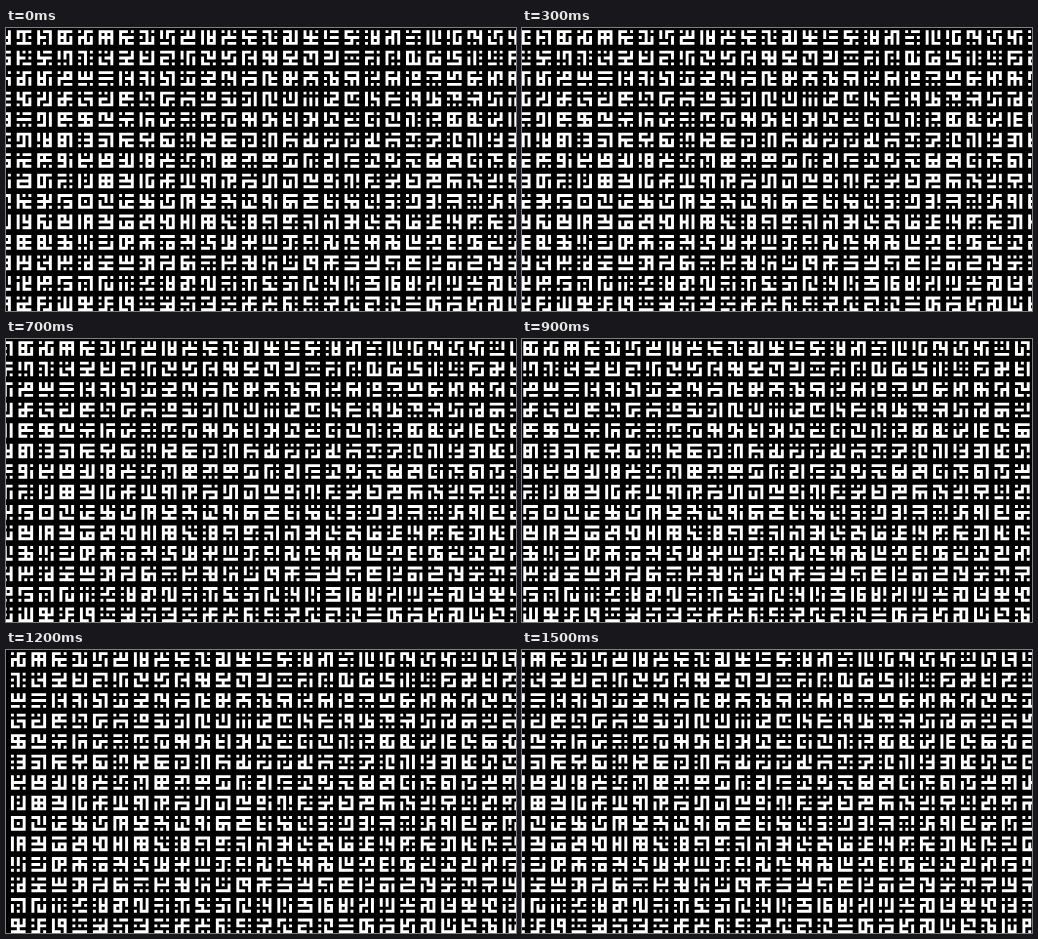
Animation, 510 px wide and 283 px high, one loop 1600 ms. Source, as an HTML page:

```html
<!DOCTYPE html>
<html lang="en">
<head>
<meta charset="utf-8">
<title>Scrolling lattice glyphs</title>
<style>
html, body { margin: 0; width: 100%; height: 100%; overflow: hidden; background: #000; }
svg { display: block; width: 100vw; height: 100vh; }
</style>
</head>
<body>
<svg viewBox="0 0 510 283">
  <rect width="510" height="283" fill="#000"/>
  <path id="glyphs" fill="none" stroke="#fff" stroke-linecap="square"/>
</svg>
<script>
const PITCH = 20.49, UNIT = PITCH / 7, LEFT = 10.7, TOP = 2.2;
const ROWS = 14, COLS = 31;
const LOOP = 1600, STEP = 100, SHIFT = 5.6;

function seeded(seed) {
  return () => {
    seed = (seed + 0x6D2B79F5) | 0;
    let n = Math.imul(seed ^ (seed >>> 15), 1 | seed);
    n = (n + Math.imul(n ^ (n >>> 7), 61 | n)) ^ n;
    return ((n ^ (n >>> 14)) >>> 0) / 4294967296;
  };
}

// Fixed glyphs: whether the link leaving node (i, j) is drawn.
const fixed = {
  '0,4': (i, j, across) => across ? j < 2 : true,
  '7,4': () => true,
  '8,3': (i, j, across) => (across ? j : i) !== 1
};

// A glyph is a 3 x 3 lattice of dots whose neighbours may be linked.
function glyph(x, y, linked) {
  const len = 2 * UNIT;
  let d = '';
  for (let j = 0; j < 3; j++) {
    for (let i = 0; i < 3; i++) {
      const at = `M${(x + i * len).toFixed(2)} ${(y + j * len).toFixed(2)}`;
      d += at + 'h0';
      if (i < 2 && linked(i, j, true)) d += at + 'h' + len.toFixed(2);
      if (j < 2 && linked(i, j, false)) d += at + 'v' + len.toFixed(2);
    }
  }
  return d;
}

function lattice() {
  const random = seeded(4096);
  const coin = () => random() < 0.5;
  let d = '';
  for (let row = 0; row < ROWS; row++) {
    for (let col = -1; col < COLS; col++) {
      const x = LEFT + col * PITCH + UNIT / 2;
      const y = TOP + row * PITCH + UNIT / 2;
      d += glyph(x, y, fixed[row + ',' + col] || coin);
    }
  }
  return d;
}

const path = document.getElementById('glyphs');
path.setAttribute('stroke-width', UNIT);
path.setAttribute('d', lattice());

function draw(ms) {
  const step = Math.floor((ms % LOOP) / STEP);
  path.setAttribute('transform', `translate(${(-step * SHIFT).toFixed(2)} 0)`);
}

const start = performance.now();
function tick() {
  draw(performance.now() - start);
  requestAnimationFrame(tick);
}
tick();
</script>
</body>
</html>
```
